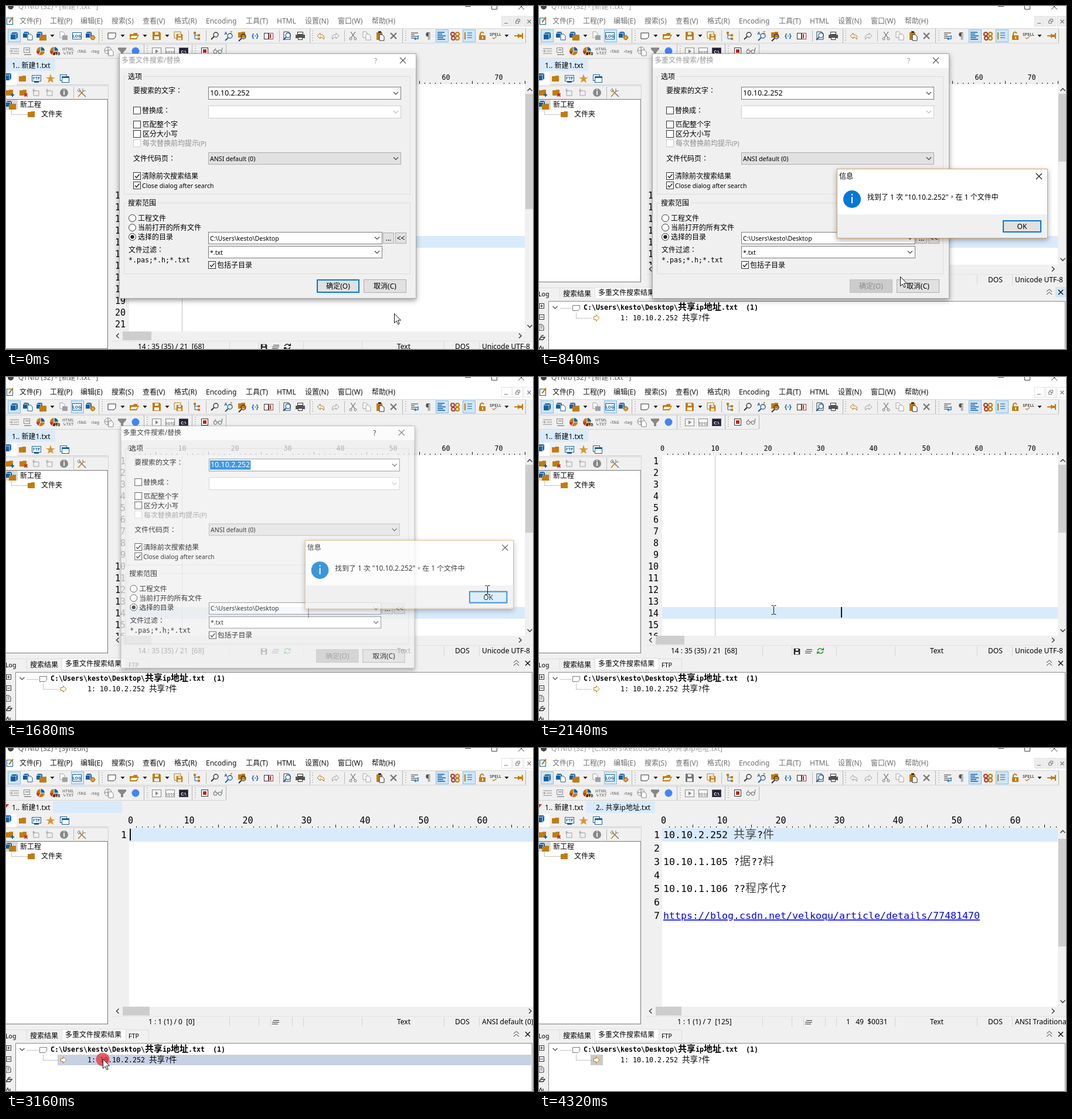
Write an HTML page that moves like this. It is 899 by 586 pixels and loops after 4.43 s.

```html
<!DOCTYPE html>
<html lang="zh-Hant">
<head>
<meta charset="utf-8">
<title>多重文件搜索</title>
<style>
html, body { margin: 0; width: 100%; height: 100%; overflow: hidden; background: #f0f0f0; }
svg { display: block; }
text { font: 12px 'Noto Sans', 'Noto Sans CJK TC', 'Noto Sans CJK', sans-serif; white-space: pre; fill: #000; }
.s { font-size: 10.6px; }
.m { font-size: 12.6px; }
.mono { font-family: 'DejaVu Sans Mono', 'Noto Sans CJK TC', 'Noto Sans CJK', monospace; }
.res { font-size: 11.63px; }
.ed { font-size: 16.61px; }
.ed tspan { letter-spacing: 1px; fill: #444; font-weight: 300; }
.num { font-size: 15px; text-anchor: end; }
.mid { text-anchor: middle; }
.b { font-weight: bold; }
.off { fill: #8c8c8c; }
#menu text { fill: inherit; }
.dlg { transform-box: fill-box; transform-origin: center; }
</style>
</head>
<body>
<svg id="stage" width="899" height="586" viewBox="0 0 899 586"></svg>
<script>
const LOOP = 4430;
const BLUE = '#155f9f', GOLD = '#c27c0e', GREY = '#a0a0a0', INK = '#333', ACCENT = '#0078d7';
const DIR = String.raw`C:\Users\kesto\Desktop`;

// Drawing helpers
const text = (x, y, s, cls = '', more = '') => `<text x="${x}" y="${y}" class="${cls}" ${more}>${s}</text>`;
const rect = (x, y, w, h, fill, stroke, more = '') => stroke
  ? `<rect x="${x + .5}" y="${y + .5}" width="${w - 1}" height="${h - 1}" fill="${fill}" stroke="${stroke}" ${more}/>`
  : `<rect x="${x}" y="${y}" width="${w}" height="${h}" fill="${fill}" ${more}/>`;
const line = (d, stroke = INK, w = 1, fill = 'none') =>
  `<path d="${d}" stroke="${stroke}" stroke-width="${w}" fill="${fill}"/>`;
const area = (d, fill) => `<path d="${d}" fill="${fill}"/>`;
const dotted = d => `<path d="${d}" fill="none" stroke="#888" stroke-dasharray="1 1"/>`;
const disc = (x, y, r, fill, stroke = 'none', w = 1) =>
  `<circle cx="${x}" cy="${y}" r="${r}" fill="${fill}" stroke="${stroke}" stroke-width="${w}"/>`;
const group = (id, s, more = '') => `<g id="${id}" ${more}>${s}</g>`;
const at = (x, y, s) => `<g transform="translate(${x} ${y})">${s}</g>`;
const cjk = (s, size) => s.replace(/[\u4e00-\u9fff]+/g, m => `<tspan font-size="${size}">${m}</tspan>`);
const chevron = (x, y, c = '#444') => line(`M${x - 4} ${y - 2}l4 4 4-4`, c, 1.2);
const cross = (x, y, r, c = INK, w = 1.1) => line(`M${x - r} ${y - r}l${2 * r} ${2 * r}m0 ${-2 * r}l${-2 * r} ${2 * r}`, c, w);

// Icons, centred on 0,0
const cubeAt = (x, y, r, c = BLUE) => at(x, y,
  area(`M${-r} ${-r / 2}L${-r / 2} ${-r}H${r}V${r / 2}L${r / 2} ${r}H${-r}Z`, c) +
  line(`M${-r} ${-r / 2}H${r / 2}V${r}M${r / 2} ${-r / 2}L${r} ${-r}`, '#fff', .8));
const sheet = (x = 0, y = 0, c = INK) => line(`M${x - 4} ${y - 5}h5l3 3v7h-8z`, c, 1, '#fff');
const folder = (c = GOLD) => area('M-6-4h5l1-1h6v10h-12z', c);
const lens = (x = 0, y = 0, c = INK) => disc(x + 2, y - 2, 4, 'none', c, 1.3) + line(`M${x - 1} ${y + 1}l-5 5`, c, 2);
const floppy = c => area('M-7-7h12l2 2v12h-14z', c) + rect(-3, -6, 6, 4, '#fff') + rect(-4, 1, 8, 5, '#fff');
const rows = (w, c = INK) => line(`M${-w} -5h${2 * w}M${-w} -2h${w}M${-w} 1h${2 * w}M${-w} 4h${w}`, c, 1.2);
const undo = c => line('M-7 0L-2-5V-2Q7-2 4 6Q3 2-2 2V5Z', c);
const gear = (x, y, c = GOLD) => disc(x, y, 3, 'none', c, 2) + line(`M${x - 5} ${y}h10M${x} ${y - 5}v10`, c, .9);
const tiny = (s, y = 2, c = '#555') => text(0, y, s, 'mid', `style="font-size:7px;font-weight:bold;fill:${c}"`);
const icons = {
  cube: cubeAt(0, 0, 6),
  cubeDoc: cubeAt(-3, -2, 5) + sheet(4, 2, BLUE),
  cubeOpen: cubeAt(-3, -2, 5) + at(3, 3, folder()),
  docs: sheet(-2, -2, GREY) + rect(-2, -1, 9, 8, GREY),
  log: rect(-8, -6, 16, 12, '#fff', BLUE) + tiny('LOG', 3, BLUE),
  cubeGear: cubeAt(-3, -2, 5) + gear(4, 3),
  page: line('M-7-5h13v7l-3 3h-10z', INK, 1, '#fff'),
  open: area('M-8 6v-9h6l1-2h6v3h3l-4 8z', GOLD) + area('M-5 0h11l-3 4h-10z', '#fff3d5'),
  saveAll: at(-2, -2, line('M-5-5h11v11h-11z', GOLD)) + at(2, 2, `<g transform="scale(.75)">${floppy(GOLD)}</g>`),
  tree: line('M-3-5V5H3M-3-1H3', BLUE) + rect(-5, -7, 4, 4, GOLD) + rect(2, -3, 4, 4, GOLD) + rect(2, 3, 4, 4, GOLD),
  find: lens(),
  replace: at(-4, -2, tiny('A', 0, BLUE)) + at(5, -3, tiny('Z', 0, GOLD)) + lens(1, 2, BLUE),
  folderFind: at(0, -2, folder()) + lens(1, 3),
  brace: text(0, 4, '{·}', 'mid b', `style="fill:${BLUE};font-size:11px"`),
  book: rect(-8, -5, 8, 11, '#fff', INK) + rect(0, -5, 8, 11, '#fff', '#a33') + line('M3-3v7', '#a33', 2),
  docFind: line('M-5-7h8l3 3v10h-11z', INK, 1, '#fff') + lens(0, 1, BLUE),
  print: rect(-5, -7, 10, 5, '#fff', INK) + rect(-8, -2, 16, 6, '#555') + rect(-4, 2, 8, 5, '#fff', INK),
  redo: `<g transform="scale(-1 1)">${undo(GREY)}</g>`,
  cut: line('M-4-7L3 3M4-7L-3 3', '#777', 1.3) + disc(-4, 5, 2, 'none', '#777') + disc(4, 5, 2, 'none', '#777'),
  copy: sheet(-2, -2, GREY) + sheet(3, 2, GREY),
  paste: rect(-6, -6, 10, 13, GOLD) + rect(-3, -8, 5, 3, INK) + sheet(3, 3),
  del: cross(0, 0, 5, '#777', 2.4),
  wrap: rows(6) + line('M6-1v6H0m2-2l-2 2 2 2', ACCENT, 1.3),
  para: text(0, 5, '¶', 'mid', 'style="font-size:14px;fill:#555"'),
  align: line('M-7-6H5M-7-3H1M-7 0H7M-7 3H3M-7 6H6', BLUE, 1.3),
  gears: [[-4, -3], [4, -3], [-3, 4], [4, 4]].map(([x, y], i) => disc(x, y, 3, 'none', i % 2 ? GOLD : '#b23a2a', 2)).join(''),
  lines: line('M-6-6v12', GOLD, 2) + line('M-2-5h8M-2-1h8M-2 3h8', BLUE),
  lock: rect(-5, -1, 11, 8, GOLD) + line('M-3-1v-3q3-5 6 0', GOLD, 2) + rect(0, 1, 2, 4, '#fff'),
  spell: tiny('SPELL', 0) + line('M-5 3l2 2 5-4', GOLD, 1.2),
  pin: area('M-8 -1h6v-3l3 2h4v-3h2v10h-2v-3h-4l-3 2v-3h-6z', GOLD),
  dd: area('M-3.5-2h7L0 2z', '#111'),
  sep: line('M.5-10V10', '#bbb'),
  grip: line('M-1-9V10', '#aaa', 2).replace('/>', ' stroke-dasharray="1 3"/>'),
  edge: line('M.5-12V12', '#b4b4b4'),
  indent: line('M-7-4H8M-1 0H8M-7 4H8M-8 0h5l-2-2m2 2l-2 2', '#888'),
  form: rect(-6, -6, 11, 9, 'none', '#888') + line('M-5 6H7M-3-2H3', '#888', 1.5),
  pie: disc(0, 0, 7, GOLD) + area('M0 0V-7A7 7 0 0 1 7 0Z', BLUE) + area('M0 0H-7A7 7 0 0 0-3 6Z', '#b33') + line('M0-7V0H7M0 0L-3 6', '#fff'),
  html: tiny('HTML', -1, '#888') + tiny('↳TXT', 6, '#888'),
  tagUp: tiny('‹TAG', 3, '#888'),
  tag: tiny('‹tag', 3, '#888'),
  globe: disc(-1, -1, 6, 'none', '#888') + line('M-7-1H5M-1-7V5', '#888') + sheet(4, 3, '#888'),
  filter: area('M-7-6H7V-3L2 2V7H-2V2L-7-3Z', '#888'),
  dot: disc(0, 0, 6.5, '#4285f4'),
  play: rect(-8, -6, 16, 13, '#f8f8f8', '#888') + area('M-2-3l5 3.5-5 3.5z', '#888'),
  bin: rect(-8, -6, 16, 13, '#f8f8f8', '#888') + tiny('1010', 5, '#888'),
  cmd: rect(-8, -6, 16, 13, '#223', '#556') + tiny('C:\\', 4, '#fff'),
  rec: rect(-6, -6, 12, 12, '#fff', INK) + rect(-3, -3, 6, 6, '#b02a1c'),
  specs: disc(-4, 1, 3, 'none', '#666') + disc(4, 1, 3, 'none', '#666') + line('M-1 0h2M-7 0l4-5M7 0l1-6', '#666'),
  folderNew: folder() + line('M2 4h6M5 1v6', BLUE, 2),
  folderDel: folder() + cross(5, 4, 2.5, '#c22', 1.8),
  ghost: line('M-5-3h9v8h-9z', GREY) + line('M-7-4h5M-5-7v6', GREY),
  info: disc(0, 0, 7, '#888') + text(0, 4, 'i', 'mid b', 'style="fill:#fff"'),
  tools: line('M-4-4L7 7', '#777', 1.5) + line('M3-3L-6 7', GOLD, 1.5) + line('M-7-4l3-3 2 4-3 2zM2-7v4h5', '#777'),
  ftp: rect(-8, -6, 16, 11, '#fff', BLUE) + tiny('FTP', 2, BLUE) + line('M-4 6H4', BLUE, 2),
  star: area('M0-8L2-2H8L3 1 5 7 0 4-5 7-3 1-8-2H-2Z', '#d9952f'),
  wins: rect(-8, -7, 12, 11, '#fff', BLUE) + rect(-5, -4, 13, 11, '#fff', BLUE) + rect(-5, -4, 13, 3, BLUE),
  folder: folder(),
};
const row = (y, list) => list.split(' ').map(e => { const [k, x] = e.split(':'); return at(x, y, icons[k]); }).join('');
const pressed = x => rect(x, 40, 22, 22, '#cfe6f8', '#83bdea');

const menu = [[23, '文件(F)'], [75, '工程(P)'], [127, '编辑(E)'], [180, '搜索(S)'], [233, '查看(V)'], [287, '格式(R)'],
  [341, 'Encoding'], [409, '工具(T)'], [462, 'HTML'], [510, '设置(N)'], [566, '窗口(W)'], [624, '帮助(H)']];

const chrome =
  rect(0, 0, 899, 38, '#fff') + disc(8, 1, 5, '#444') +
  text(21, 5, '', '', 'id="title"') +
  line('M783 .5h10M828.5 0v5.5h9V0M874 -4l10 10M884 -4l-10 10', '#444') +
  rect(1, 20, 11, 12, '#fff', BLUE) + line('M5 28l7-9', GOLD, 2.2) +
  group('menu', menu.map(([x, s]) => text(x, 30, s)).join('')) +
  group('mdi', [845, 864, 883].map(x => rect(x, 17, 18, 18, 'inherit', '#e2e2e2')).join('')) +
  line('M850 29.5h6M869.5 25.5h5v4h-5zM871.5 25v-2.5h5v4H875', '#777') + cross(892.5, 26.5, 3, '#777') +
  line('M0 38.5H887M0 63.5H887M0 65.5H375M0 89.5H375', '#d4d4d4') +
  pressed(3) + group('log', pressed(111)) + pressed(733) + pressed(779) +
  row(51, 'cube:14 cubeDoc:37 cubeOpen:60 dd:79 docs:98 log:121 cubeGear:144 edge:158 grip:165 page:181 dd:199 open:219 dd:237 dd:275 saveAll:294 sep:311 tree:325 sep:341 find:356 replace:379 folderFind:402 brace:425 book:448 sep:466 docFind:479 print:502 edge:518 grip:524 redo:561 sep:577 cut:592 copy:615 paste:638 del:661 edge:676 grip:683 wrap:697 para:720 align:743 gears:766 lines:789 lock:812 spell:835 dd:854 pin:875 edge:886') +
  group('dirty', at(257, 51, floppy(GOLD)) + at(538, 51, undo(GOLD))) +
  group('clean', at(257, 51, floppy('#777')) + at(538, 51, undo(GREY))) +
  row(77, 'indent:14 form:36 pie:59 pie:82 html:106 tagUp:129 tag:152 globe:175 filter:198 dot:221 edge:235 grip:242 play:257 bin:280 cmd:303 edge:317 grip:324 rec:339 specs:361 edge:375') +
  at(86, 84, tiny('#10', 0, '#111')) +
  group('tab1', rect(0, 91, 84, 20, '#d9ebfb')) +
  group('tab2', rect(80, 91, 118, 20, '#d9ebfb') + area('M0 96h5l-5 6z', '#e02020')) +
  text(10, 106, '1.. 新建1.txt') + text(97, 106, '2.. 共享ip地址.txt', '', 'id="tabName"');

const side =
  rect(0, 113, 18, 22, '#fff') + line('M18 134.5H175', '#ccc') +
  row(124, 'folder:28 ftp:52 star:76 wins:100') + cubeAt(3, 121, 6) +
  line('M0 136.5H174.5V159', '#d4d4d4') +
  row(148, 'folderNew:6 folderDel:29 ghost:52 ghost:75 info:99 sep:115 tools:129') +
  rect(-2, 159, 176, 427, '#fff', '#777') + rect(0, 160, 20, 17, '#d9d9d9') +
  at(8, 169, icons.cubeOpen) + text(24, 173, '新工程') + dotted('M9.5 178v7.5H37') +
  at(43, 185, folder()) + text(60, 189, '文件夹');

// Character ruler with labels every ten columns
function ruler(x0, step, end, y, size) {
  let ticks = '', labels = '';
  for (let i = 0; x0 + i * step < end; i++) {
    const x = x0 + i * step + .5;
    if (i % 10 == 0) labels += text(x, y, i, 'mid mono', `style="font-size:${size}px"`);
    else ticks += i % 5 ? `M${x} ${y + 5}v2` : `M${x} ${y + 2}v5`;
  }
  return line(ticks, '#111') + labels;
}
const count = (n, f) => Array.from({ length: n }, (_, i) => f(i)).join('');

const docA = rect(210, 134, 675, 452, '#fff') + rect(210, 393, 675, 20, '#d9eafb') +
  line('M300.5 134V586', '#c0c0c0') + ruler(210, 9, 886, 126, 11.7) +
  count(21, i => text(204, 148.5 + i * 20, i + 1, 'mono num'));

const url = 'https://blog.csdn.net/velkoqu/article/details/77481470';
const body = [[0, '10.10.2.252 共享?件'], [2, '10.10.1.105 ?据??料'], [4, '10.10.1.106 ??程序代?']];
const docB = rect(210, 137, 689, 310, '#fff') + rect(210, 137, 689, 23, '#d9eafb') + ruler(212, 10, 899, 129, 15) +
  text(206, 154, 1, 'mono ed', 'text-anchor="end"') +
  group('loaded', count(6, i => text(206, 177 + i * 23, i + 2, 'mono ed', 'text-anchor="end"')) +
    body.map(([n, s]) => text(212, 154 + n * 23, cjk(s, 19), 'mono ed')).join('') +
    text(212, 292, url, 'mono ed', 'style="fill:#00f;text-decoration:underline"') + rect(885, 114, 14, 23, '#f0f0f0'));

const vscroll = rect(885, 134, 14, 452, '#f0f0f0') + rect(886, 150, 13, 116, '#cdcdcd', '', 'id="thumb"') +
  line('M889.5 145l4-4 4 4', '#444', 1.6);

const panel = rect(0, 472, 899, 114, '#f0f0f0') + line('M0 471.5H174', '#777') +
  text(-1, 496, 'Log', 's') + text(41, 496, '搜索结果') + rect(95, 480, 110, 21, '#fff', '#ddd') +
  text(101, 494, '多重文件搜索结果') + text(209, 496, 'FTP', 's') + line('M0 481.5H95M205 481.5h38.5V500M35.5 482v18', '#ddd') +
  rect(881, 480, 18, 18, '#cfe6f8', '', 'id="closeHot"') +
  line('M866 488l4.5-4 4.5 4m-9 5l4.5-4 4.5 4') + cross(890, 489, 4, '#111', 1.5) +
  rect(16, 504, 882, 90, '#fff', '#888') +
  [512, 531].map(y => rect(0, y - 4, 9, 9, '#fff', INK) + line(`M2 ${y + .5}h5`)).join('') + line('M4.5 510v5') +
  sheet(4, 549) + line('M2 547h4M2 550h4') + line('M0 570h7l3-4h-7zM3 565q2-3 5-2M0 586l3-5 2 5M7 582v4', INK, 1.3) +
  group('result',
    rect(88, 524, 808, 18, '#c7d1e4', '', 'id="pick"') + rect(88, 524, 21, 18, '#c9c9c9', '', 'id="pickIcon"') +
    chevron(27.5, 515) + dotted('M36 516.5H56M63.5 524v9.5H90') +
    line('M57.5 511.5h12v6l-3 3h-9z', '#777', 1, '#fff') +
    line('M93.5 530.5h4v-3l5.5 5.5-5.5 5.5v-3h-4z', GOLD, 1, '#fff') +
    text(76, 519, cjk(DIR + '\\共享ip地址.txt  (1)', 15), 'mono res b') +
    text(139, 537, cjk('1: 10.10.2.252 共享?件', 13.5), 'mono res'));

const refresh = c => line('M475 467q4-6 9-1m1 3q-4 6-9 1', c, 1.6) + area('M481 467h5v-5zM479 469h-5v5z', c);
const lower = rect(182, 442, 717, 36, '#f0f0f0') + line('M182 458.5H899', '#e2e2e2') +
  rect(199, 442, 49, 15, '#cdcdcd', '', 'id="hthumb"') + line('M192.5 445.5l-4 4 4 4', '#444', 1.6) +
  group('right', line('M875 445.5l4 4-4 4', '#444', 1.6)) +
  group('down', line('M889.5 431l4 4 4-4', '#444', 1.6)) +
  line('M381.5 460v16M431.5 460v16M507.5 460v16M607.5 460v16M747.5 460v16M807.5 460v16', '#d5d5d5') +
  text(225, 472, '', '', 'id="pos"') + text(524, 472, '1   49  $0031', '', 'id="code"') +
  text(667, 472, 'Text') + text(766, 472, 'DOS') + text(812, 472, '', '', 'id="enc"') +
  line('M456 465.5h10M454 468.5h12M454 471.5h10') +
  group('stA', at(440, 469, `<g transform="scale(.75)">${floppy('#222')}</g>`) + group('ref', refresh('#222')) + group('refOn', refresh('#2c9a3a'))) +
  group('stB', line('M451.5 460v16M488.5 460v16', '#d5d5d5'));

const check = (x, y, on, c = INK) => rect(x, y, 13, 13, '#fff', c) + (on ? line(`M${x + 3} ${y + 6.5}l2.5 3 5-6`, '#222', 1.4) : '');
const radio = (y, on) => disc(215.5, y, 6, '#fff', INK) + (on ? disc(215.5, y, 3.2, '#222') : '');
const combo = (x, y, w, h, s, cls, fill = '#fff', edge = '#7a7a7a') =>
  rect(x, y, w, h, fill, edge) + text(x + 3, y + h / 2 + 4, s, cls) + chevron(x + w - 9, y + h / 2, edge == '#ccc' ? '#bbb' : '#444');
const button = (x, y, w, h, s, cls = '', fill = '#e1e1e1', edge = '#adadad') =>
  rect(x, y, w, h, fill, edge) + text(x + w / 2, y + h / 2 + 4.5, s, 'mid ' + cls);
const focus = (x, y, w, h) =>
  `<rect x="${x + 1}" y="${y + 1}" width="${w - 2}" height="${h - 2}" fill="none" stroke="${ACCENT}" stroke-width="2"/>`;
const frame = (y, h, s, w) => rect(201, y, 489, h, 'none', '#dcdcdc') + rect(206, y - 2, w, 5, '#f0f0f0') + text(208, y + 4.5, s);

const dialog = group('shade', rect(193, 81, 507, 419, '#f0f0f0')) +
  rect(193, 81, 507, 419, '#f0f0f0', '#a8a8a8') + rect(194, 82, 505, 24, '#fff') +
  group('dlgHead', text(197, 97, '多重文件搜索/替换', '', 'style="fill:inherit"') + text(628, 98, '?', '', 'style="fill:inherit"')) + cross(677, 93, 5, '#555') +
  frame(120, 202, '选项', 30) + frame(336, 122, '搜索范围', 54) +
  text(217, 149, '要搜索的文字：') + combo(345, 138, 329, 22, '10.10.2.252', 'm') +
  group('selected', rect(347, 141, 70, 16, ACCENT) + text(348, 153, '10.10.2.252', 'm', 'style="fill:#fff"')) +
  check(217, 172) + text(232, 183, '替换成：') + combo(345, 170, 329, 22, '', '', '#fff', '#ccc') +
  check(217, 196) + text(233, 207, '匹配整个字') + check(217, 212) + text(233, 223, '区分大小写') +
  check(217, 228, 0, '#ccc') + text(233, 239, '每次替换前均提示<tspan font-size="10.6">(P)</tspan>', 'off') +
  text(217, 265, '文件代码页：') + combo(345, 250, 329, 21, 'ANSI default (0)', 's', '#e1e1e1', '#adadad') +
  check(217, 284, 1) + text(232, 295, '清除前次搜索结果') + check(217, 300, 1) + text(232, 311, 'Close dialog after search', 's') +
  radio(362.5) + text(225, 367, '工程文件') + radio(378.5) + text(225, 383, '当前打开的所有文件') + radio(394.5, 1) + text(225, 399, '选择的目录') +
  combo(345, 386, 297, 21, DIR, 's') + button(643, 387, 19, 19, '...') + button(664, 387, 19, 19, '&lt;&lt;') +
  text(209, 421, '文件过滤：') + text(209, 438, '*.pas;*.h;*.txt', 'mono res') + combo(345, 410, 297, 21, '*.txt', 's') +
  check(345, 436, 1) + text(360, 447, '包括子目录') +
  group('okOn', button(530, 467, 73, 23, '确定(O)') + focus(530, 467, 73, 23)) +
  group('okOff', button(530, 467, 73, 23, '确定(O)', 'off', '#ccc', '#bfbfbf')) +
  button(610, 467, 73, 23, '取消(C)');

const message = rect(508, 278, 360, 119, '#fff', '#dca45a', 'style="filter:drop-shadow(0 3px 5px #0005)"') +
  rect(509, 356, 358, 40, '#f0f0f0') + text(512, 295, '信息') + cross(853, 291, 5, '#111') +
  disc(534, 330, 15, ACCENT) + rect(533, 326, 2, 11, '#fff') + rect(533, 321, 2, 2.5, '#fff') +
  text(560, 331, '找到了 1 次 "10.10.2.252"，在 1 个文件中') +
  button(791, 366, 66, 21, 'OK') + group('okHit', button(791, 366, 66, 21, 'OK', '', '#d5e9f8')) + focus(791, 366, 66, 21);

const pointer =
  group('ring', disc(0, 1, 11.5, '#e8303a'), 'opacity=".75"') +
  group('arrow', line('M.5 .5V16.5L4.2 13 6.8 18.8 9.2 17.8 6.6 12H11.5Z', '#111', 1, '#fff')) +
  group('beam', line('M-3.5-7.5H-.5L.5-6.5 1.5-7.5H4.5M.5-6V7M-3.5 7.5H-.5L.5 6.5 1.5 7.5H4.5', '#111'));

document.getElementById('stage').innerHTML = rect(0, 0, 899, 586, '#f0f0f0') + chrome + side +
  group('docA', docA) + group('docB', docB) + group('vscroll', vscroll) +
  rect(515, 393, 2, 18, '#111', '', 'id="caretA"') + rect(211, 138, 2, 20, '#111', '', 'id="caretB"') +
  group('panel', panel) + group('lower', lower) +
  group('dialog', dialog, 'class="dlg"') + group('message', message, 'class="dlg"') + group('pointer', pointer);

// Screen updates come in short runs: first, last, steps
const runs = [[0, 0, 1], [70, 520, 7], [610, 1060, 7], [1140, 1600, 7], [1680, 2140, 7], [2220, 2690, 7],
  [2760, 2990, 4], [3160, 3320, 3], [3470, 3940, 7], [4010, 4010, 1], [4320, 4320, 1]];
const ticks = runs.flatMap(([a, b, n]) => Array.from({ length: n }, (_, i) => Math.round(a + (b - a) * i / (n - 1 || 1))));

const path = [[0, 662, 525], [370, 573, 478], [690, 573, 478], [1250, 829, 382], [1600, 829, 382], [1680, 821, 364],
  [2140, 400, 398], [2690, 130, 535], [2840, 165, 531], [3400, 165, 531], [3940, 757, 581], [LOOP, 757, 581]];

function pointerAt(t) {
  const i = path.findIndex(p => p[0] > t), [t0, x0, y0] = path[i - 1], [t1, x1, y1] = path[i];
  const u = (t - t0) / (t1 - t0), e = u * u * (3 - 2 * u);
  return [Math.round(x0 + (x1 - x0) * e), Math.round(y0 + (y1 - y0) * e)];
}

const $ = id => document.getElementById(id);
const show = (id, on) => { $(id).style.display = on ? '' : 'none'; };
const set = (id, attrs) => { for (const k in attrs) $(id).setAttribute(k, attrs[k]); };
const fade = (id, o, scale) => { show(id, o > 0); $(id).style.opacity = o; $(id).style.transform = `scale(${scale})`; };

function render(now) {
  const t = ticks.findLast(k => k <= now);
  const within = (a, b) => t >= a && t < b;
  const second = t >= 3160, loaded = t >= 3230, open = t >= 520, active = within(1680, 4320);
  const blank = second && !loaded;

  $('title').textContent = 'QTNib (32) - [' + (loaded ? DIR + '\\共享ip地址.txt' : second ? 'SynEdit' : '新建1.txt *') + ']';
  $('title').style.fill = active ? '#555' : '#999';
  set('menu', { fill: active ? '#111' : '#6d6d6d' });
  set('mdi', { fill: active ? '#fff' : '#ececec' });
  show('log', open);
  show('dirty', !loaded); show('clean', loaded);
  show('tab1', !second); show('tab2', second); show('tabName', loaded);

  show('docA', !second); show('docB', second); show('loaded', loaded);
  show('vscroll', !blank); show('down', !blank);
  set('thumb', { y: second ? 155 : 150, height: second ? 184 : open ? 116 : 197 });
  show('caretA', within(1680, 2210) || within(2740, 3160));
  show('caretB', within(3160, 3700));

  set('lower', { transform: `translate(0 ${open ? 0 : 114})` });
  set('hthumb', { width: loaded ? 44 : second ? 46 : 49 });
  set('right', { transform: `translate(${blank ? 17 : 0} 0)` });
  set('pos', { x: loaded ? 236 : second ? 243 : 225 });
  $('pos').textContent = loaded ? '1 : 1 (1) / 7  [125]' : second ? '1 : 1 (1) / 0  [0]' : '14 : 35 (35) / 21  [68]';
  $('enc').textContent = loaded ? 'ANSI Traditional' : second ? 'ANSI default (0)' : 'Unicode UTF-8';
  show('code', loaded); show('stA', !second); show('stB', second);
  show('ref', !open); show('refOn', open);

  show('panel', open); show('result', t >= 610); show('closeHot', !active && !second);
  show('pick', within(2900, 3230)); show('pickIcon', loaded);

  const out = t < 1680 ? 1 : t < 1750 ? .75 : t < 1830 ? .25 : 0;
  const scale = out == 1 ? 1 : out == .75 ? .99 : .96;
  fade('dialog', out, scale);
  fade('message', t < 680 ? 0 : t < 755 ? .5 : out, within(680, 755) ? .97 : scale);
  $('shade').style.filter = `drop-shadow(0 3px ${within(1600, 1680) ? 8 : 4}px #0006)`;
  set('dlgHead', { fill: t >= 1600 ? '#111' : '#999' });
  show('selected', t >= 1600);
  show('okOn', t < 440); show('okOff', t >= 440); show('okHit', t >= 1440);

  const [x, y] = pointerAt(t), beam = t >= 1680 && y < 442;
  show('pointer', t < 4010);
  set('pointer', { transform: `translate(${x} ${y})` });
  show('beam', beam); show('arrow', !beam);
  show('ring', within(370, 440) || within(1440, 1590) || within(2900, 3230));
}

function loop() {
  render(performance.now() % LOOP);
  requestAnimationFrame(loop);
}
loop();
</script>
</body>
</html>
```
